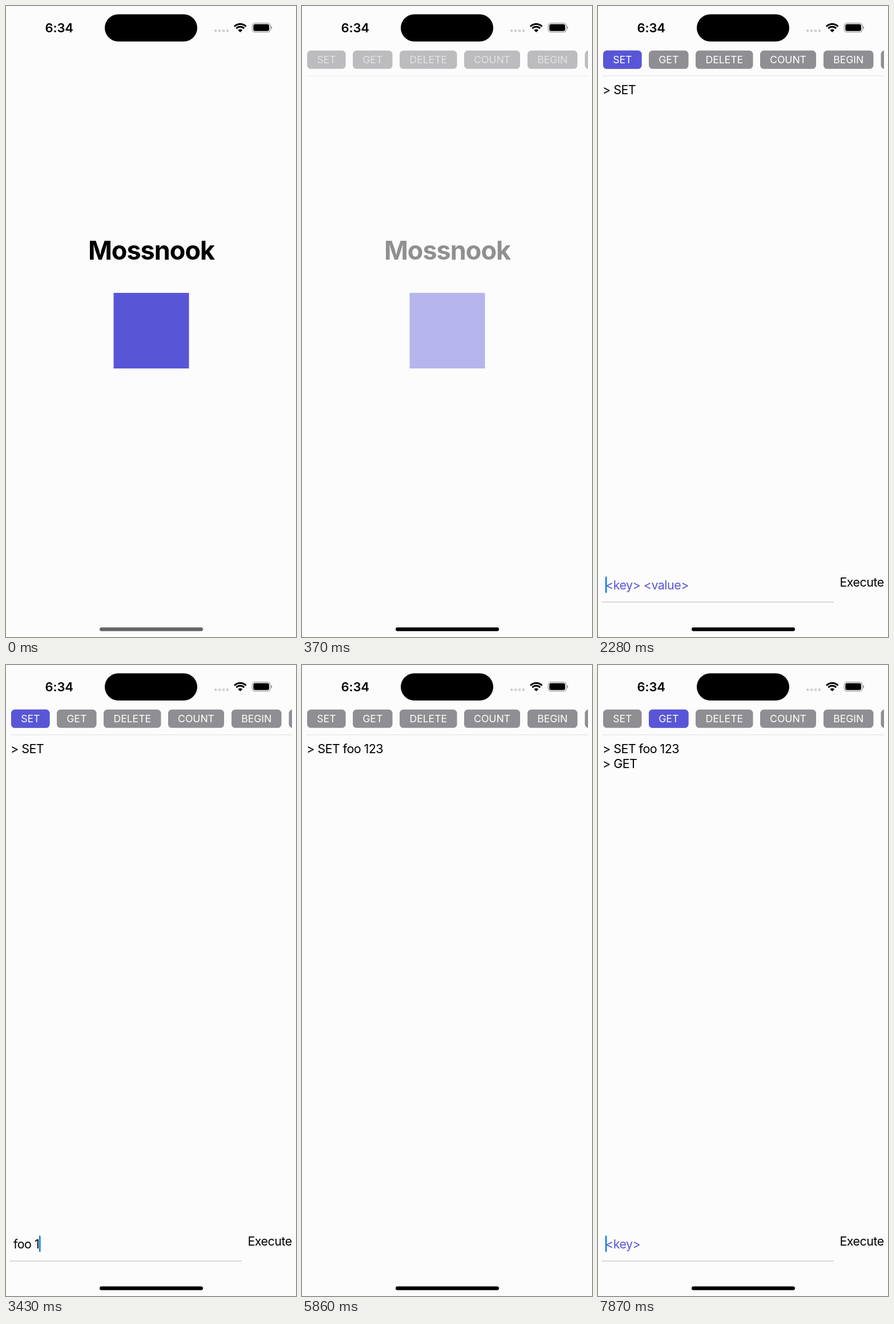
Recreate the animation shown at these times as an HTML page with a canvas. Size 508 px wide and 1102 px high, loop 8000 ms.

```html
<!DOCTYPE html>
<html lang="en">
<head>
<meta charset="utf-8">
<title>Key-value store</title>
<style>
  html, body { margin: 0; width: 100%; height: 100%; overflow: hidden; background: #fcfcfc; }
  canvas { display: block; width: 508px; height: 1102px; }
</style>
</head>
<body>
<canvas id="stage" width="508" height="1102"></canvas>
<script>
const c = document.getElementById('stage').getContext('2d');
const LOOP = 8000;
const BG = '#fcfcfc', PURPLE = '#5856d6', GRAY = '#8e8e93';
const BODY = '21.5px', SMALL = '17.7px';

// label, left, width
const BUTTONS = [
  ['SET', 9, 67.5], ['GET', 89, 69.5], ['DELETE', 171, 100.5],
  ['COUNT', 284, 98], ['BEGIN', 395, 87.5], ['', 495.5, 90]
];
const TAPS = { SET: 1680, GET: 6830 };
const PRESS = 100;                       // finger down to release
const EXECUTE = 4740, COMMIT = EXECUTE + 110;
const KEYS = [2720, 2820, 2930, 3150, 3350, 3640, 3860];
const INPUT = 'foo 123';

const ramp = (t, a, b) => Math.min(1, Math.max(0, (t - a) / (b - a)));
const ease = (t, a, b) => { const p = ramp(t, a, b); return p * p * (3 - 2 * p); };

function box(x, y, w, h, r, color) {
  c.fillStyle = color;
  c.beginPath();
  c.roundRect(x, y, w, h, r);
  c.fill();
}

function text(s, x, y, { size = BODY, weight = 400, color = '#000', gap = -0.55, align = 'left' } = {}) {
  c.font = `${weight} ${size} Inter, "Liberation Sans", sans-serif`;
  c.letterSpacing = gap + 'px';
  c.textAlign = align;
  c.fillStyle = color;
  c.fillText(s, x, y);
  return c.measureText(s).width;
}

function faded(alpha, draw) {
  if (alpha <= 0) return;
  c.save();
  c.globalAlpha *= alpha;
  draw();
  c.restore();
}

function statusBar() {
  text('6:34', 68.5, 46, { size: '22px', weight: 600, gap: -0.1 });
  box(173, 14.5, 162, 47.5, 23.75, '#000');
  for (let i = 0; i < 4; i++) box(364.8 + i * 7, 41, 4.6, 4.6, 2, '#d0d0d0');

  // wifi: two arcs and a wedge around one point
  const x = 410.3, y = 46, a = -Math.PI * 3 / 4, b = -Math.PI / 4;
  c.strokeStyle = c.fillStyle = '#000';
  c.lineWidth = 3;
  for (const r of [14.5, 9.7]) {
    c.beginPath();
    c.arc(x, y, r, a, b);
    c.stroke();
  }
  c.beginPath();
  c.moveTo(x, y);
  c.arc(x, y, 5.6, a, b);
  c.fill();

  // battery
  c.strokeStyle = '#9a9a9a';
  c.lineWidth = 1.2;
  c.beginPath();
  c.roundRect(431.3, 29.8, 31.6, 15.9, 4.8);
  c.stroke();
  box(433.3, 31.7, 27.6, 12.1, 3.2, '#000');
  box(464.2, 35.3, 1.8, 5, 1, '#9a9a9a');
}

function splash() {
  text('Mossnook', 254.5, 443, { size: '45px', weight: 700, gap: -1, align: 'center' });
  c.fillStyle = PURPLE;
  c.fillRect(188.5, 501, 132, 132);
}

// How purple a button is
function selection(name, t) {
  const tap = TAPS[name];
  if (tap === undefined || t < tap + PRESS) return 0;
  return name === 'SET' ? 1 - ease(t, COMMIT, COMMIT + 300) : 1;
}

// How strongly a button still shows its press
function pressure(name, t) {
  const tap = TAPS[name];
  return tap === undefined ? 0 : ramp(t, tap, tap + 60) * (1 - ease(t, tap + 90, tap + 330));
}

function toolbar(t) {
  c.save();
  c.beginPath();
  c.rect(0, 70, 501, 60);
  c.clip();
  for (const [name, x, w] of BUTTONS) {
    const on = selection(name, t), press = pressure(name, t);
    if (on) faded(press * 0.75, () => box(x - 1.5, 76.3, w + 3, 35, 7.5, PURPLE));
    box(x, 77.8, w, 32, 6.5, GRAY);
    faded(on, () => box(x, 77.8, w, 32, 6.5, PURPLE));
    faded(1 - press * 0.75, () =>
      text(name, x + w / 2, 100.2, { size: SMALL, gap: -0.1, color: '#fff', align: 'center' }));
  }
  c.fillStyle = '#e4e4e4';
  c.fillRect(8, 121.3, 493, 1.2);
  c.restore();
}

function log(t) {
  if (t >= TAPS.SET + PRESS) text(t < COMMIT ? '> SET' : '> SET ' + INPUT, 8, 153.7);
  if (t >= TAPS.GET + PRESS) text('> GET', 8, 180.2);
}

function caretAlpha(t) {
  const blink = (out, back) => ramp(t, out, out + 110) * (1 - ramp(t, back, back + 110));
  return 1 - blink(2350, 2480) - blink(7500, 7750);
}

function field(t) {
  const getting = t >= TAPS.GET;
  const typed = getting ? '' : INPUT.slice(0, KEYS.filter(k => t >= k).length);
  const width = text(typed, 13, 1018.8);
  if (!typed) text(getting ? '<key>' : '<key> <value>', 13, 1018.8, { color: PURPLE });
  faded(caretAlpha(t), () => box(12.8 + width, 996.5, 2.6, 28.5, 1.2, '#087ce8'));
  c.fillStyle = '#c8c8d0';
  c.fillRect(6.5, 1040.3, 406.5, 1.3);
  const press = ramp(t, EXECUTE + 20, EXECUTE + 60) * (1 - ramp(t, COMMIT, COMMIT + 200));
  faded(1 - 0.75 * press * !getting, () => text('Execute', 423.5, 1014));
}

function fieldAlpha(t) {
  if (t >= TAPS.GET + PRESS) return 1;
  return t >= TAPS.SET + PRESS ? 1 - ease(t, COMMIT, COMMIT + 350) : 0;
}

function draw(now) {
  const t = now % LOOP;
  c.fillStyle = BG;
  c.fillRect(0, 0, 508, 1102);
  statusBar();

  const shown = ease(t, 165, 540);
  faded(1 - shown, splash);
  faded(shown, () => toolbar(t));
  log(t);
  faded(fieldAlpha(t), () => field(t));

  const shade = Math.round(100 * (1 - ramp(t, 180, 300)));
  box(164, 1085.3, 181, 6.4, 3.2, `rgb(${shade},${shade},${shade})`);
  requestAnimationFrame(draw);
}
requestAnimationFrame(draw);
</script>
</body>
</html>
```
